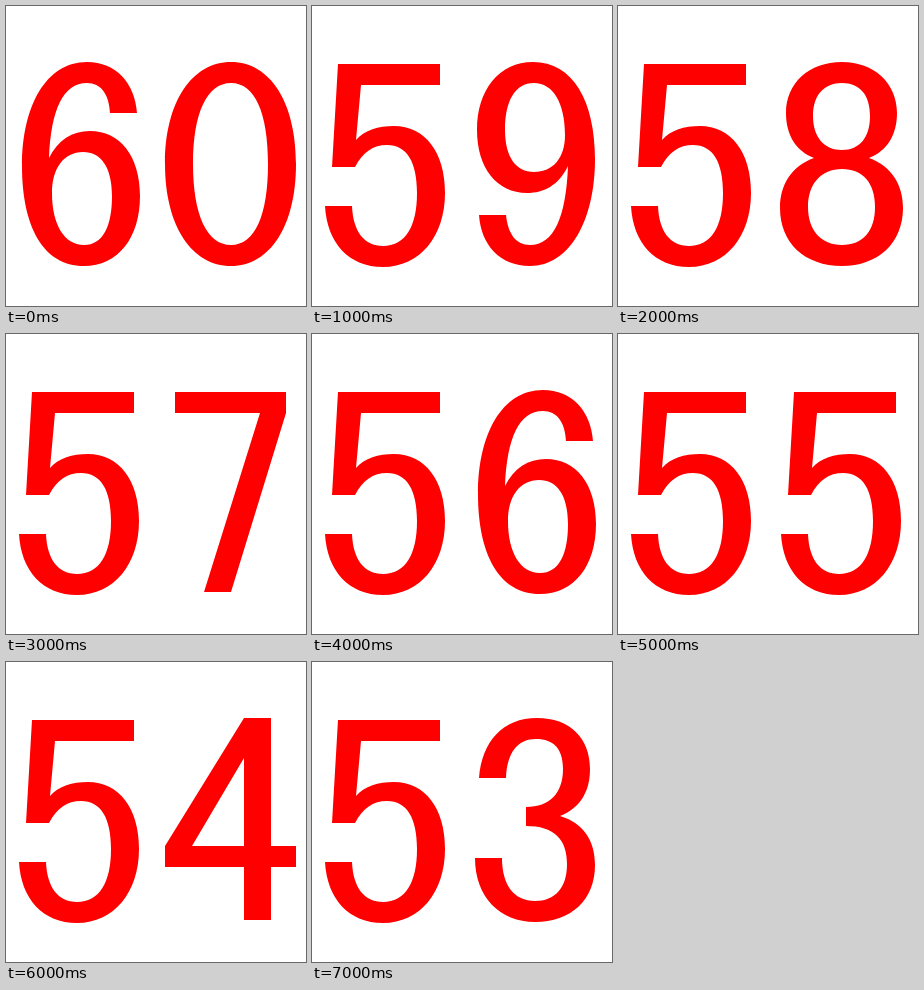
An HTML page that plays this animation: 300x300 px, repeating every 8000 ms.

```html
<!DOCTYPE html>
<html lang="en">
<head>
<meta charset="utf-8">
<title>Countdown</title>
<style>
  html, body { margin: 0; width: 100%; height: 100%; overflow: hidden; background: #fff; }
  svg { display: block; width: 100%; height: 100%; fill: #f00; fill-rule: evenodd; }
</style>
</head>
<body>
<svg viewBox="0 0 300 300" role="img">
  <path id="tens"/>
  <path id="ones" transform="translate(150)"/>
</svg>
<script>
// Outlines of the digits, each in a cell 150 wide
const DIGITS = {
  0: 'M75 56C114 56 140 96 140 158S114 260 75 260 9 220 9 158 36 56 75 56Z' +
     'M75 77C51 77 37 107 37 158S51 239 75 239 112 209 112 158 99 77 75 77Z',
  3: 'M17 116C20 79 41 56 75 56C108 56 128 76 128 107C128 130 118 146 98 154' +
     'C121 161 133 178 133 203C133 238 109 260 73 260C38 260 13 235 13 196H40' +
     'C40 223 52 239 73 239C93 239 105 226 105 202C105 177 92 164 64 164V145' +
     'C88 145 101 131 101 107C101 87 92 77 74 77C56 77 45 90 44 116Z',
  4: 'M88 56H115V184H140V205H115V258H88V205H9V184ZM88 96L36 184H88Z',
  5: 'M26 58H128V79H49L44 134C53 124 66 120 82 120C113 120 133 146 133 187' +
     'C133 230 108 261 71 261C37 261 15 237 13 200H40C41 225 52 240 71 240' +
     'C93 240 105 221 105 187C105 156 95 139 75 139C61 139 51 146 43 161H20Z',
  6: 'M131 107C129 77 110 56 81 56C40 56 16 100 16 160C16 220 37 260 78 260' +
     'C112 260 134 232 134 190C134 150 114 125 84 125C66 125 52 134 43 152' +
     'C45 104 57 77 81 77C95 77 103 88 104 107Z' +
     'M77 146C95 146 106 161 106 190C106 220 97 239 78 239C58 239 46 218 46 187C46 162 58 146 77 146Z',
  7: 'M19 58H130V79L75 258H48L104 79H19Z',
  8: 'M74 56C106 56 129 77 129 107C129 129 119 145 101 152C123 160 135 178 135 202' +
     'C135 237 110 260 74 260C37 260 12 237 12 202C12 178 24 160 46 152' +
     'C28 145 18 129 18 107C18 77 41 56 74 56Z' +
     'M74 77C56 77 45 89 45 110S56 144 74 144 102 131 102 110 92 77 74 77Z' +
     'M74 163C53 163 40 178 40 201S53 239 74 239 107 225 107 201 95 163 74 163Z',
  9: 'M17 209C19 239 38 260 68 260C108 260 133 214 133 153C133 95 111 56 71 56' +
     'C37 56 15 84 15 124C15 162 35 187 65 187C82 187 97 179 106 160' +
     'C104 211 92 239 68 239C54 239 46 228 44 209Z' +
     'M72 77C91 77 103 97 103 129C103 152 91 166 72 166C54 166 43 151 43 124C43 95 53 77 72 77Z'
};
const START = 60, STEP = 1000, COUNT = 8;
const svg = document.querySelector('svg');
const [tens, ones] = svg.querySelectorAll('path');
let shown;

function draw(now) {
  const value = START - Math.floor(now / STEP) % COUNT;
  if (value !== shown) {
    shown = value;
    tens.setAttribute('d', DIGITS[Math.floor(value / 10)]);
    ones.setAttribute('d', DIGITS[value % 10]);
    svg.setAttribute('aria-label', value);
  }
  requestAnimationFrame(() => draw(performance.now()));
}
draw(performance.now());
</script>
</body>
</html>
```
